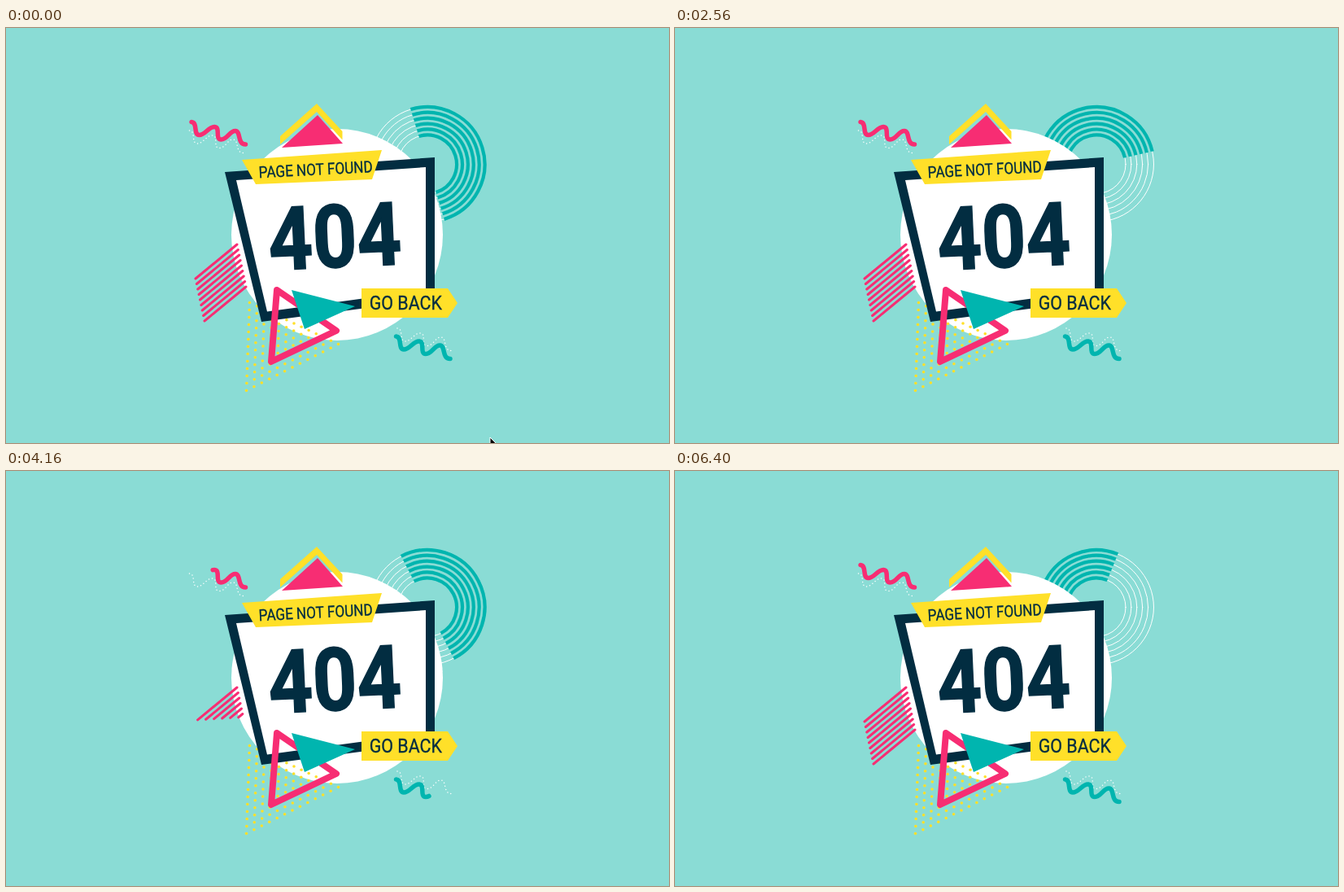
An HTML page that plays this animation: 815 px wide and 510 px high, repeating every 6.56 s.

```html
<!DOCTYPE html>
<html lang="en">
<head>
<meta charset="utf-8">
<title>404</title>
<style>
  html, body { margin: 0; width: 100%; height: 100%; overflow: hidden; background: #8adcd5; }
  svg { display: block; width: 815px; height: 510px; }
  text {
    font-family: Roboto, "Liberation Sans", sans-serif; text-anchor: middle;
    fill: #022d41; stroke: #022d41; stroke-width: .3;
  }
  .dark { fill: #022d41; }
  .yellow { fill: #ffe029; }
  .pink { fill: #f72d73; }
  .teal { fill: #00b5af; }
  .line { fill: none; stroke-linecap: round; stroke-linejoin: round; }
  .dotted { stroke: #fff; stroke-width: 1.5; stroke-dasharray: 0 4.2; }
</style>
</head>
<body>
<svg viewBox="0 0 815 510">
  <defs>
    <path id="wave" d="M228 115.5C236 116 230 131.5 237.5 131.5S249 121 256.5 121.5S256.5 137 264.5 137S275 126 282 126.5S284 143 294.5 143"/>
  </defs>

  <g id="rings" class="line" stroke="#fff" stroke-width="1"></g>
  <g id="halfRings" fill="none" stroke="#00b5af" stroke-width="4.2"></g>

  <circle cx="407" cy="254" r="130" fill="#fff"/>
  <g id="dots" class="yellow"></g>
  <path fill="#fff" d="M276 182L521 165V328L318 354Z"/>
  <path class="dark" fill-rule="evenodd" d="M269 177L527 159V333L314 361ZM283 187L321 348.5L516 322V171Z"/>

  <g id="peak">
    <path class="yellow" d="M337 133L382 93L413.5 127V137.5L382 103L337 143Z"/>
    <path class="pink" d="M339 147L383 107L414 142Z"/>
  </g>

  <path class="yellow" d="M290 162L462 150L450 186L307 192Z"/>
  <text font-size="19.8" transform="translate(381 180.7) rotate(-2.9) scale(.865 1)">PAGE NOT FOUND</text>
  <text font-size="108" font-weight="700" style="stroke-width:1.5" transform="translate(405.8 294) rotate(-2.6) scale(.88 1)">404</text>

  <g id="hatch" class="line" stroke="#f72d73" stroke-width="3"></g>

  <use href="#wave" class="line dotted" x="-2.5" y="10.5"/>
  <use href="#wave" class="line dotted" x="253" y="253.5"/>
  <use id="waveA" href="#wave" class="line" stroke="#f72d73" stroke-width="5.5"/>
  <use id="waveB" href="#wave" class="line" stroke="#00b5af" stroke-width="5.5" x="251.5" y="263.5"/>

  <path id="outline" class="line" stroke="#f72d73" stroke-width="8" d="M333 322L406 372L326 410Z"/>
  <path id="solid" class="teal" d="M351 322L429 342L367 370Z"/>

  <path class="yellow" d="M437 320H543L555 338L543 356H437Z"/>
  <text font-size="24.5" transform="translate(491.3 346) scale(.875 1)">GO BACK</text>

  <path id="cursor" fill="#000" stroke="#fff" stroke-width="1" d="M0 0V16L3.7 12.6L6.3 18.5L8.8 17.4L6.3 11.6H11.4Z"/>
</svg>
<script>
const LOOP = 6560, STEP = 160, RELOAD = 3360;
const $ = id => document.getElementById(id);
const clamp = x => Math.min(1, Math.max(0, x));

function add(parent, tag, attrs) {
  const el = document.createElementNS('http://www.w3.org/2000/svg', tag);
  for (const k in attrs) el.setAttribute(k, attrs[k]);
  return parent.appendChild(el);
}

for (let i = 0; i < 6; i++) {
  const r = 36 + i * 6.9;
  add($('rings'), 'circle', { cx: 518, cy: 167.5, r });
  add($('halfRings'), 'path', { d: `M${r} 0A${r} ${r} 0 0 1 ${-r} 0` });
}

// Triangular lattice of dots
const N = 12;
for (let i = 0; i <= N; i++) {
  for (let j = 0; i + j <= N; j++) {
    add($('dots'), 'circle', {
      cx: 295.5 + (i * 113 + j * 4) / N,
      cy: 445.5 - (i * 57 + j * 108) / N,
      r: 1.8
    });
  }
}

const hatch = [];
for (let i = 0; i < 9; i++) {
  const x = 284 + i * 1.375, y = 266 + i * 6.5;
  hatch.push({ x, y, el: add($('hatch'), 'line', { x1: x, y1: y }) });
}

const waveLength = $('wave').getTotalLength();

// [time, degrees]; the second list runs after the reload
const turnA = [[0, -107], [1120, 14.5], [1920, 103], [3200, 231]];
const turnB = [[3360, 156.5], [3680, 191], [4960, 329], [6400, 472]];

function along(table, t) {
  let i = 1;
  while (i < table.length - 1 && t > table[i][0]) i++;
  const [t0, a] = table[i - 1], [t1, b] = table[i];
  return a + (b - a) * (t - t0) / (t1 - t0);
}

// Progress of an entrance; everything is complete before the reload
function enter(t, start, dur) {
  return t < RELOAD ? 1 : clamp((t - start) / dur);
}

function spinIn(id, x, y, p) {
  $(id).setAttribute('transform',
    `translate(${x} ${y}) rotate(${720 * (1 - p)}) scale(${p}) translate(${-x} ${-y})`);
  $(id).setAttribute('opacity', p);
}

function render(t) {
  const angle = along(t < RELOAD ? turnA : turnB, t);
  $('halfRings').setAttribute('transform', `translate(518 167.5) rotate(${angle})`);

  const p = 1 - (1 - enter(t, 3440, 457)) ** 2;
  spinIn('outline', 374.5, 366, p);
  spinIn('solid', 377, 363.5, p);
  $('peak').setAttribute('transform', `translate(0 ${9 * (1 - p)})`);
  $('peak').setAttribute('opacity', p);

  const drawn = enter(t, 3600, 900) * waveLength, fade = enter(t, 3600, 145);
  for (const id of ['waveA', 'waveB']) {
    $(id).style.strokeDasharray = `${drawn} ${2 * waveLength}`;
    $(id).style.opacity = fade;
  }
  $('waveA').style.strokeDashoffset = drawn - waveLength;

  hatch.forEach(({ x, y, el }, i) => {
    const k = enter(t, 3600 + i * 100, 590);
    el.setAttribute('x2', x - 51 * k);
    el.setAttribute('y2', y + 42 * k);
    el.setAttribute('opacity', k > 0 ? 1 : 0);
  });

  const c = clamp(t / 640);
  $('cursor').setAttribute('transform', `translate(${595 + 66 * c} ${503 - 523 * c})`);
  $('cursor').setAttribute('opacity', c < 1 ? 1 : 0);
}

function tick() {
  const t = performance.now() % LOOP;
  render(Math.floor(t / STEP) * STEP);
  requestAnimationFrame(tick);
}
tick();
</script>
</body>
</html>
```
